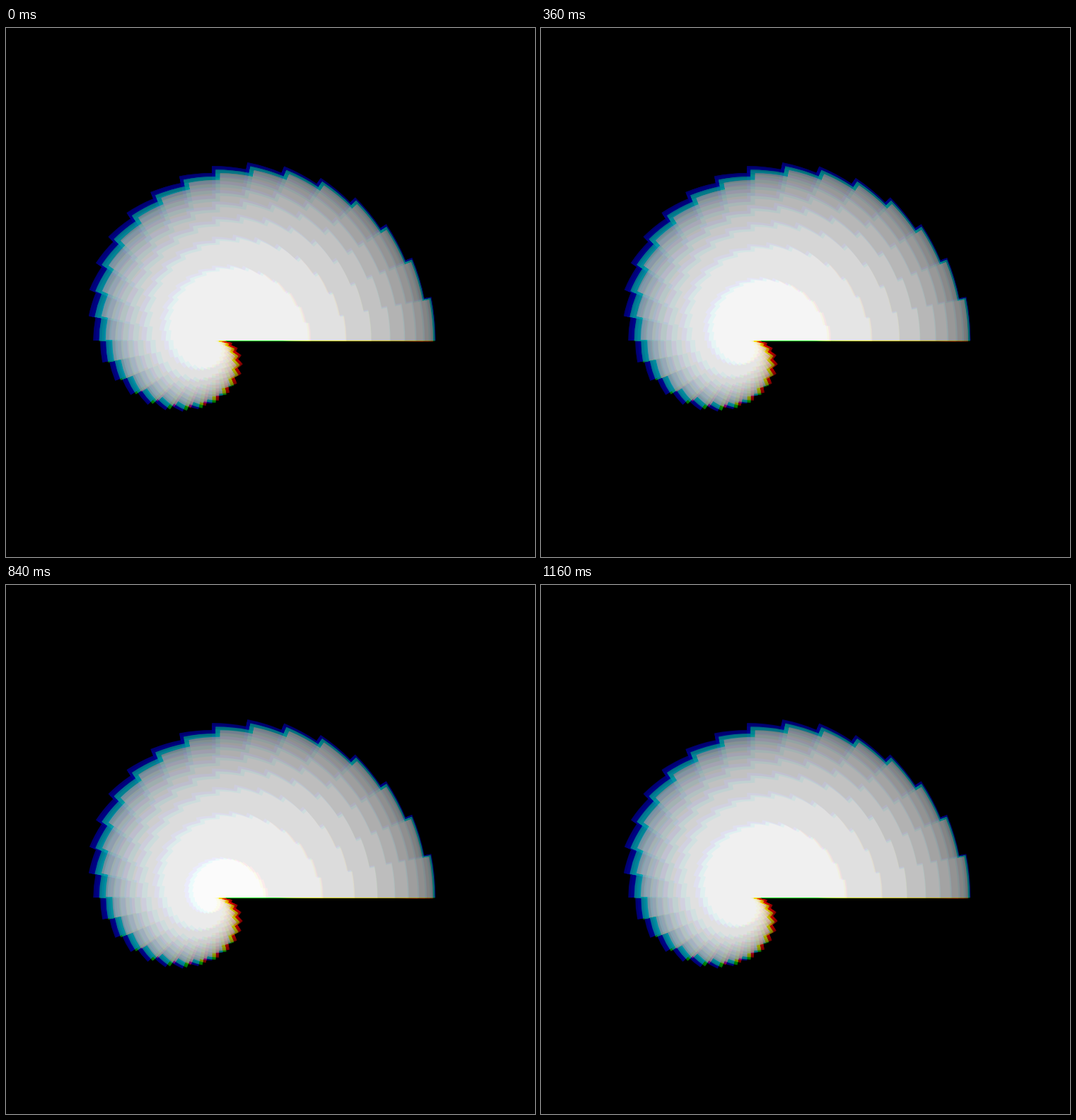
Recreate the animation shown at these times as an HTML page with a canvas. Size 748x748 px, loop 1200 ms.

```html
<!DOCTYPE html>
<html lang="en">
<head>
<meta charset="utf-8">
<title>Spiral dome</title>
<style>
  html, body { margin: 0; width: 100%; height: 100%; overflow: hidden; background: #000; }
  canvas { display: block; width: 100vw; height: 100vh; }
</style>
</head>
<body>
<canvas id="stage" width="748" height="748"></canvas>
<script>
const SIZE = 748, LOOP = 1200, STEP = 40;
const WEDGES = 32, ANGLE = Math.PI * 2 / WEDGES;
const LAYERS = 10;

// Each colour channel has its own centre, radius step per wedge and tiny tilt.
const channels = [
  { rgb: [1, 0, 0], x: 301.5, y: 441.6, unit: 9.45, tilt: 0.0055 },
  { rgb: [0, 1, 0], x: 296.4, y: 442.5, unit: 9.69, tilt: 0 },
  { rgb: [0, 0, 1], x: 291.3, y: 442, unit: 9.88, tilt: 0 }
];

const ctx = document.getElementById('stage').getContext('2d');
const buffer = document.createElement('canvas');
buffer.width = buffer.height = SIZE;
const pen = buffer.getContext('2d');

// Stepped spiral: every wedge is one unit shorter than the one before it.
function spiral(ch, scale) {
  pen.beginPath();
  pen.moveTo(ch.x, ch.y);
  for (let k = 0; k < WEDGES; k++) {
    const start = ch.tilt - k * ANGLE;
    pen.arc(ch.x, ch.y, (WEDGES - k) * ch.unit * scale, start, start - ANGLE, true);
  }
  pen.closePath();
  pen.fill();
}

// Slices of a dome, stacked from the rim up; depth 0 is the white top.
function drawChannel(ch, phase) {
  pen.clearRect(0, 0, SIZE, SIZE);
  for (let n = LAYERS + 1; n >= 1; n--) {
    const depth = n - phase;
    if (depth <= 0) continue;
    const height = 1 - depth / LAYERS;
    const light = Math.round(255 - 15.4 * depth);
    pen.fillStyle = `rgb(${ch.rgb.map(c => c * light)})`;
    spiral(ch, depth >= LAYERS ? 1 : Math.sqrt(1 - height * height));
  }
  ctx.drawImage(buffer, 0, 0);
}

function draw(time) {
  const tick = Math.floor((time % LOOP) / STEP);
  const phase = (tick + 1) * STEP / LOOP;
  ctx.globalCompositeOperation = 'source-over';
  ctx.fillStyle = '#000';
  ctx.fillRect(0, 0, SIZE, SIZE);
  ctx.globalCompositeOperation = 'lighter';
  channels.forEach(ch => drawChannel(ch, phase));
}

let begin = null;
function frame(now) {
  if (begin === null) begin = now;
  draw(now - begin);
  requestAnimationFrame(frame);
}
draw(0);
requestAnimationFrame(frame);
</script>
</body>
</html>
```
